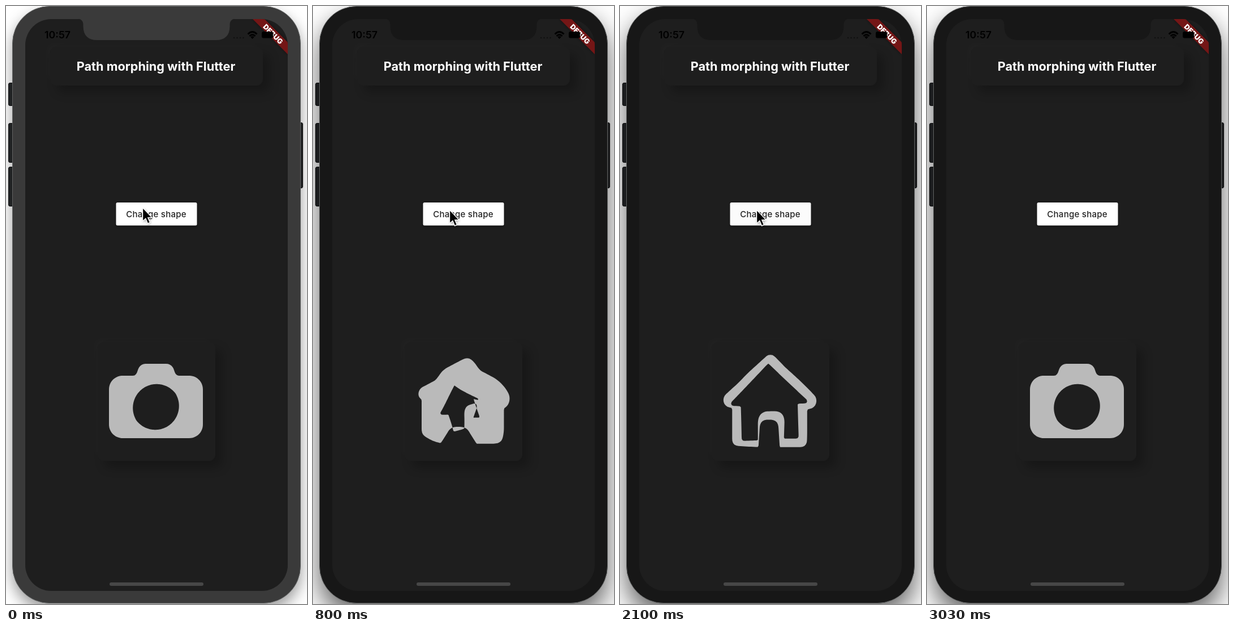
Animation, 532 px wide and 1053 px high, one loop 3710 ms. Source, as an HTML page:

```html
<!DOCTYPE html>
<html lang="en">
<head>
<meta charset="utf-8">
<title>Path morphing</title>
<style>
  html, body { margin: 0; width: 100%; height: 100%; overflow: hidden; background: #fff; }
  #stage { position: relative; width: 532px; height: 1053px; overflow: hidden; background: #fff;
    --case: #171717; --glow: 0 22px 46px rgba(0,0,0,.62); }
  #stage.idle { --case: #3a3a3a; --glow: 0 12px 26px rgba(0,0,0,.4); }
  #stage > * { position: absolute; box-sizing: border-box; }
  .key { background: #27292b; border: 1px solid #121314; border-radius: 3px; }
  .case { left: 11px; top: 0; width: 510px; height: 1052px; border-radius: 66px;
    background: var(--case); border: 1px solid #626464; box-shadow: var(--glow); }
  .screen { left: 34px; top: 23px; width: 464px; height: 1007px; border-radius: 46px;
    background: #1e1e1e; }
  .card { border-radius: 11px; background: #1e1e1e;
    box-shadow: 12px 12px 18px rgba(0,0,0,.24), -7px -7px 12px rgba(255,255,255,.014); }
  svg { left: 0; top: 0; }
  text { font-family: Inter, "Open Sans", sans-serif; }
</style>
</head>
<body>
<div id="stage">
  <div class="key" style="left:4px;top:135px;width:12px;height:41px"></div>
  <div class="key" style="left:4px;top:206px;width:12px;height:70px"></div>
  <div class="key" style="left:4px;top:283px;width:12px;height:70px"></div>
  <div class="key" style="left:514px;top:205px;width:11px;height:116px"></div>
  <div class="case"></div>
  <div class="screen"></div>
  <div class="card" style="left:78px;top:72px;width:376px;height:68px"></div>
  <div class="card" style="left:162px;top:592px;width:208px;height:209px"></div>
  <svg width="532" height="1053" viewBox="0 0 532 1053">
    <defs>
      <clipPath id="glass"><rect x="34" y="23" width="464" height="1007" rx="46"/></clipPath>
      <filter id="soft" x="-30%" y="-30%" width="160%" height="160%"><feGaussianBlur stdDeviation="2"/></filter>
    </defs>

    <path d="M127 22.5 Q136 23 136.500 32 V36 Q137 60 161 60 H371 Q395 60 395.500 36 V32 Q396 23 405 22.500Z" fill="var(--case)"/>
    <text x="68" y="57" font-size="17.8" font-weight="600">10:57</text>
    <g fill="#111">
      <circle cx="403" cy="56" r="1.3"/><circle cx="408.500" cy="56" r="1.3"/>
      <circle cx="414" cy="56" r="1.3"/><circle cx="419.500" cy="56" r="1.3"/>
    </g>
    <g fill="none" stroke="#000" stroke-width="2.7">
      <path d="M427.500 49.500 Q435.500 41.500 443.500 49.500"/>
      <path d="M430.500 53 Q435.500 48 440.500 53"/>
    </g>
    <path d="M432.300 54.600 Q435.500 51.800 438.700 54.600 L435.500 58Z"/>

    <g clip-path="url(#glass)">
      <path d="M436 23 H457 L498 64 V85Z" fill="#000" opacity=".45" filter="url(#soft)"/>
      <path d="M436 23 H457 L498 64 V85Z" fill="#741616"/>
      <text transform="translate(472 49.500) rotate(45)" y="4.500" font-size="12.500" font-weight="900"
        text-anchor="middle" fill="#fff">DEBUG</text>
    </g>
    <rect x="452" y="45" width="20" height="11.500" rx="3"/>
    <path d="M473.300 48.500 Q476 50.700 473.300 53Z"/>

    <text x="265" y="114" font-size="21.700" font-weight="700" text-anchor="middle" fill="#fff">Path morphing with Flutter</text>

    <rect x="195" y="348" width="142" height="41" rx="3" fill="#000" opacity=".4" filter="url(#soft)"/>
    <rect id="button" x="194.500" y="346" width="143" height="40.500" rx="2.500" fill="#fff"/>
    <text x="265.600" y="371.700" font-size="15" font-weight="500" letter-spacing=".27" text-anchor="middle" fill="#222">Change shape</text>

    <path id="icon" fill="#bababa" fill-rule="evenodd"/>
    <rect x="183" y="1015" width="166" height="6" rx="3" fill="#474747"/>

    <g id="cursor">
      <path d="M0 0 V24 L5.300 19.200 L9 28 L13 26.300 L9.400 17.700 H16.800Z" transform="translate(1 2)" opacity=".4" filter="url(#soft)"/>
      <path d="M0 0 V24 L5.300 19.200 L9 28 L13 26.300 L9.400 17.700 H16.800Z" stroke="#fff" stroke-width="1.400"/>
    </g>
  </svg>
</div>
<script>
const LOOP = 3710, STEPS = 160;
const $ = id => document.getElementById(id);

// Each pair starts at matching points and runs clockwise.
const pairs = [
  [ // camera body, house silhouette
    `M283 630 C291 630 295 635 297 641 C299 648 301 651 306 651 H324 A24 24 0 0 1 348 675
     V737 A24 24 0 0 1 324 761 H206 A24 24 0 0 1 182 737 V675 A24 24 0 0 1 206 651
     H224 C229 651 231 648 233 641 C235 635 239 630 247 630Z`,
    `M264.5 613 C268 613 270 614 273 617 L343 686 C351 694 347 709 334 710 L329.5 711
     V766 Q329.5 778 317 778 H281 V741 Q281 726 267 726 H262 Q248.5 726 248.5 741
     V778 H212 Q199.5 778 199.5 766 V711 L195 710 C182 709 178 694 186 686
     L256 617 C259 614 261 613 264.5 613Z`
  ],
  [ // lens, house interior
    `M230.6 730 A42 42 0 0 1 299.4 682 A42 42 0 0 1 230.6 730Z`,
    `M264.5 622 L267 624 L337 693 C340 697 338 701 334 701 L320 702 V763 Q320 769 315 769
     H291 V739 Q291 716 270 716 H259 Q239 716 239 739 V769 H213 Q208.5 769 208.5 763
     V702 L195 701 C191 701 189 697 192 693 L262 624Z`
  ]
].map(pair => pair.map(sample));

function sample(d) {
  const path = document.createElementNS("http://www.w3.org/2000/svg", "path");
  path.setAttribute("d", d);
  const len = path.getTotalLength();
  return Array.from({ length: STEPS }, (_, i) => path.getPointAtLength(len * i / STEPS));
}

// Piecewise linear value from [time, value] steps.
function track(steps, t) {
  const i = steps.findIndex(s => s[0] > t);
  if (i < 0) return steps[steps.length - 1][1];
  if (i === 0) return steps[0][1];
  const [t0, a] = steps[i - 1], [t1, b] = steps[i];
  return a + (b - a) * (t - t0) / (t1 - t0);
}

const morph = [[230, 0], [1230, 1], [2030, 1], [3030, 0]];
const press = [[30, 0], [200, 1], [480, 1], [640, 0], [1800, 0], [1980, 1], [2140, 1], [2300, 0]];
const pointer = [[30, 355], [110, 359]];

function outline([a, b], p) {
  const mix = (u, v) => (u + (v - u) * p).toFixed(2);
  return "M" + a.map((q, i) => mix(q.x, b[i].x) + " " + mix(q.y, b[i].y)).join("L") + "Z";
}

const start = performance.now();
function draw() {
  const t = (performance.now() - start) % LOOP;
  const p = track(morph, t), tone = 255 - 4 * track(press, t);
  $("stage").classList.toggle("idle", t < 30);
  $("icon").setAttribute("d", pairs.map(pair => outline(pair, p)).join(""));
  $("button").setAttribute("fill", `rgb(${tone},${tone},${tone})`);
  $("cursor").setAttribute("transform", `translate(241.5 ${track(pointer, t)})`);
  $("cursor").setAttribute("visibility", t < 3030 ? "visible" : "hidden");
  requestAnimationFrame(draw);
}
draw();
</script>
</body>
</html>
```
